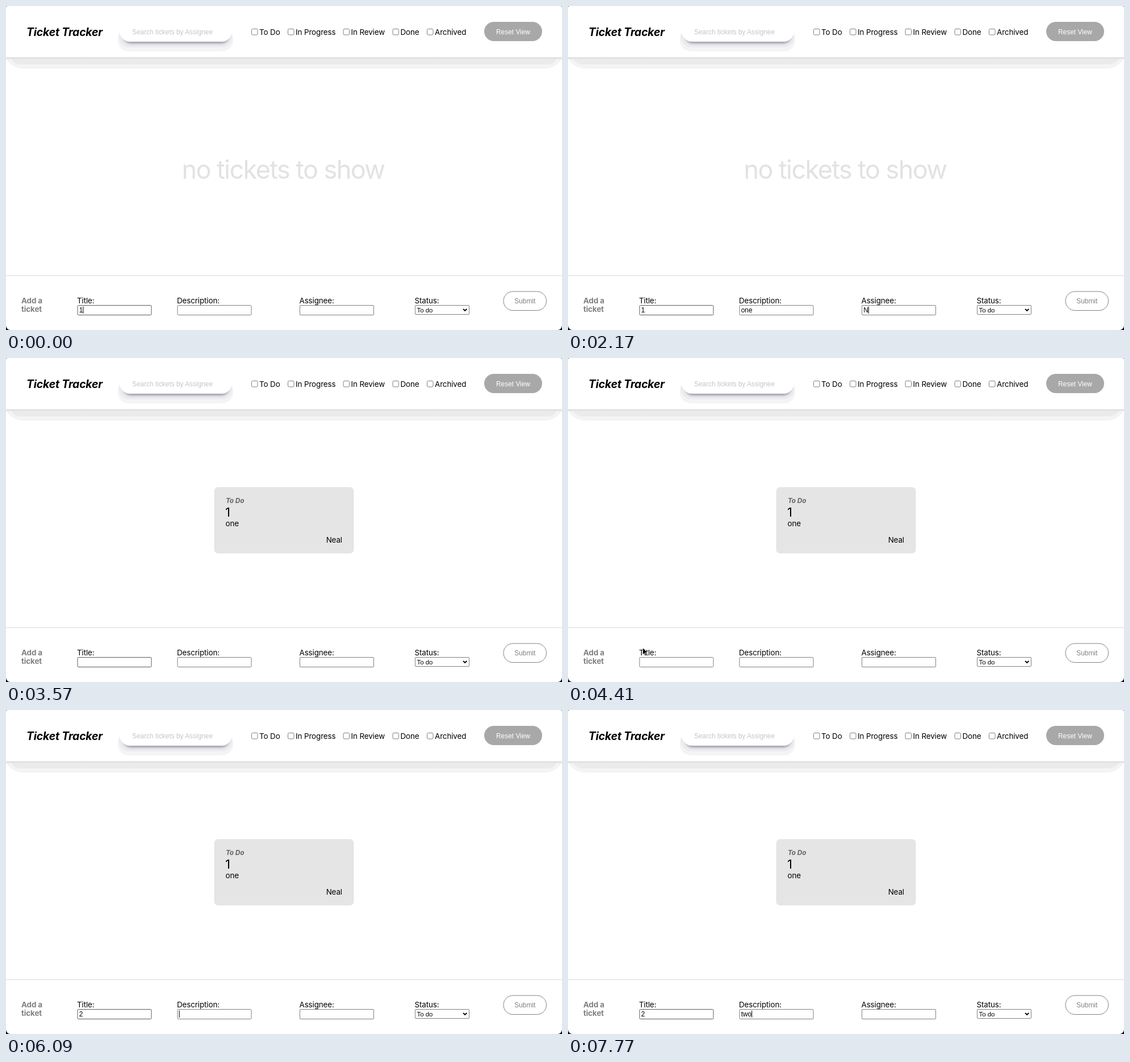
Recreate the animation shown at these times as an HTML page. Size 979 by 572 pixels, loop 8 s.

```html
<!DOCTYPE html>
<html lang="en">
<meta charset="utf-8">
<title>Ticket Tracker</title>
<style>
html, body { margin: 0; width: 100%; height: 100%; overflow: hidden; background: #0b0612; }
svg { display: block; width: 979px; height: 572px; background: #fff; border-radius: 3px 3px 8px 8px; }
text { font: 13.4px Inter, sans-serif; letter-spacing: -.008em; font-optical-sizing: none; white-space: pre; }
.ui { font: 11.9px "Liberation Sans", Arial, sans-serif; letter-spacing: 0; }
.title { font: italic 700 19.4px Inter, sans-serif; letter-spacing: -.01em; }
.bold { font-weight: 700; fill: #808080; }
.empty { font-size: 45px; letter-spacing: -.035em; fill: #e2e2e2; }
.status { font: italic 700 11.8px Inter, sans-serif; fill: #666; }
.box { fill: #fff; stroke: #808080; }
</style>
<svg viewBox="0 0 979 572">
  <defs>
    <filter id="soft" x="-20%" y="-50%" width="140%" height="200%"><feGaussianBlur stdDeviation="2.2"/></filter>
    <linearGradient id="edge" x2="0" y2="1"><stop stop-color="#d8d8d8"/><stop offset="1" stop-color="#ebebeb"/></linearGradient>
  </defs>

  <!-- header -->
  <rect x="-4" y="30" width="987" height="80.5" rx="34" fill="#f4f4f4"/>
  <rect x="6" y="50" width="967" height="53" rx="20" fill="#ebebeb"/>
  <rect y="90" width="979" height="4" fill="url(#edge)"/>
  <rect width="979" height="90.5" fill="#fff"/>
  <text class="title" x="36" y="53">Ticket Tracker</text>
  <rect x="197" y="38" width="203" height="42" rx="19" fill="#f4f4f4"/>
  <rect x="199" y="38" width="199" height="35" rx="18" fill="#ececf0"/>
  <rect x="206" y="38" width="187" height="28" rx="14" fill="#9a9aac" filter="url(#soft)"/>
  <rect x="200.5" y="28" width="197" height="35" rx="17.5" fill="#fff"/>
  <text class="ui" x="222" y="49.5" fill="#c6c6c6">Search tickets by Assignee</text>
  <g id="filters"></g>
  <rect x="842" y="28" width="102" height="34" rx="17" fill="#a8a8a8"/>
  <text class="ui" x="893" y="49.5" text-anchor="middle" fill="#fff">Reset View</text>

  <!-- ticket area -->
  <text id="empty" class="empty" x="488" y="305" text-anchor="middle">no tickets to show</text>
  <g id="card">
    <rect x="366.5" y="228" width="246" height="117" rx="7" fill="#e5e5e5"/>
    <text class="status" x="387" y="256">To Do</text>
    <text x="386" y="280" style="font-size:22px">1</text>
    <text x="386.5" y="297">one</text>
    <text x="592" y="326" text-anchor="end">Neal</text>
  </g>

  <!-- form -->
  <path d="M0 476h979" stroke="#e3e3e3" stroke-width="1.5"/>
  <text class="bold" x="27" y="525">Add a</text>
  <text class="bold" x="27" y="540">ticket</text>
  <g id="fields"></g>
  <text x="719.5" y="525">Status:</text>
  <rect class="box" x="720.5" y="528.5" width="95" height="16" rx="1.5"/>
  <text class="ui" x="723.5" y="540.5" style="font-size:11.4px">To do</text>
  <path d="M805 534.8l3.2 3.2 3.2-3.2" fill="none" stroke="#000" stroke-width="1.9"/>
  <rect class="box" x="876" y="504" width="75.5" height="33.5" rx="16.75"/>
  <text class="ui" x="913.8" y="525" text-anchor="middle" fill="#808080">Submit</text>

  <rect id="caret" y="530.5" width="1" height="12.5"/>
  <path id="arrow" d="M0 0v12.5l3-2.8 2 4.6 2-.9-2-4.5h4z" stroke="#fff" stroke-width=".8"/>
  <path id="beam" d="M-2.5-7.5q2.5 0 2.5 2 0-2 2.5-2M0-5.5v11M-2.5 7.5q2.5 0 2.5-2 0 2 2.5 2" fill="none" stroke="#222"/>
</svg>
<script>
const LOOP = 8000, SUBMIT = 3570, CLICK = 5040;
const $ = id => document.getElementById(id);
const show = (el, on) => el.setAttribute('visibility', on ? 'visible' : 'hidden');
const lastBefore = (list, t) => list.findLast(k => k[0] <= t);

$('filters').innerHTML = [['To Do', 432.5], ['In Progress', 496.5], ['In Review', 594], ['Done', 681], ['Archived', 741.5]]
  .map(([label, x]) => `<rect class="box" x="${x}" y="40.5" width="10.5" height="10.5" rx="2"/>
    <text x="${x + 13.5}" y="50.5">${label}</text>`).join('');

const fieldX = [126, 302, 517.5];
$('fields').innerHTML = ['Title:', 'Description:', 'Assignee:']
  .map((label, i) => `<text x="${fieldX[i] - 1}" y="525">${label}</text>
    <rect class="box" x="${fieldX[i]}" y="528.5" width="130" height="17" rx="1.5"/>
    <text class="ui value" x="${fieldX[i] + 2.7}" y="540.5"></text>`).join('');
const values = [...document.querySelectorAll('.value')];
const titleBox = document.querySelector('#fields rect');

// time, title, description, assignee, field showing the caret (-1: none)
const typing = [
  [0, '1', '', '', 0], [490, '1', '', '', 1], [980, '1', '', '', -1],
  [1050, '1', 'o', '', 1], [1190, '1', 'on', '', 1], [1260, '1', 'one', '', 1],
  [1540, '1', 'one', '', 2], [2030, '1', 'one', '', -1],
  [2170, '1', 'one', 'N', 2], [2660, '1', 'one', 'Ne', 2], [2800, '1', 'one', 'Nea', 2],
  [2870, '1', 'one', 'Neal', 2], [3290, '1', 'one', 'Neal', -1],
  [SUBMIT, '', '', '', -1], [3850, '', '', '', 2], [4350, '', '', '', -1], [4850, '', '', '', 2],
  [CLICK, '', '', '', 0], [5530, '', '', '', -1], [5810, '2', '', '', 0],
  [6090, '2', '', '', 1], [6580, '2', '', '', -1], [7140, '2', '', '', 1],
  [7350, '2', 't', '', 1], [7490, '2', 'tw', '', 1], [7770, '2', 'two', '', 1]
];
// time, x, y of the mouse pointer
const path = [[3990, 39, 544], [4410, 131.5, 511.5], [4830, 146, 523], [5000, 158, 538], [5810, 158, 538]];

function drawPointer(t) {
  const next = path.findIndex(k => k[0] > t);
  const visible = next > 0;
  let y = 0;
  if (visible) {
    const [t0, x0, y0] = path[next - 1], [t1, x1, y1] = path[next];
    const p = (t - t0) / (t1 - t0);
    const x = x0 + (x1 - x0) * p;
    y = y0 + (y1 - y0) * p;
    for (const id of ['arrow', 'beam']) $(id).setAttribute('transform', `translate(${x} ${y})`);
  }
  const overField = t > 4830 && y > 528;
  show($('arrow'), visible && !overField);
  show($('beam'), visible && overField);
}

function draw() {
  const t = performance.now() % LOOP;
  const [, ...state] = lastBefore(typing, t);
  const focus = state[3];
  values.forEach((el, i) => { if (el.textContent !== state[i]) el.textContent = state[i]; });
  show($('caret'), focus >= 0);
  if (focus >= 0) {
    const width = state[focus] ? values[focus].getComputedTextLength() : 0;
    $('caret').setAttribute('x', fieldX[focus] + 2.7 + width);
  }
  show($('empty'), t < SUBMIT);
  show($('card'), t >= SUBMIT);
  titleBox.style.stroke = t >= 3990 && t < CLICK ? '#808080' : '#5c5c5c';
  drawPointer(t);
  requestAnimationFrame(draw);
}
draw();
</script>
</html>
```
